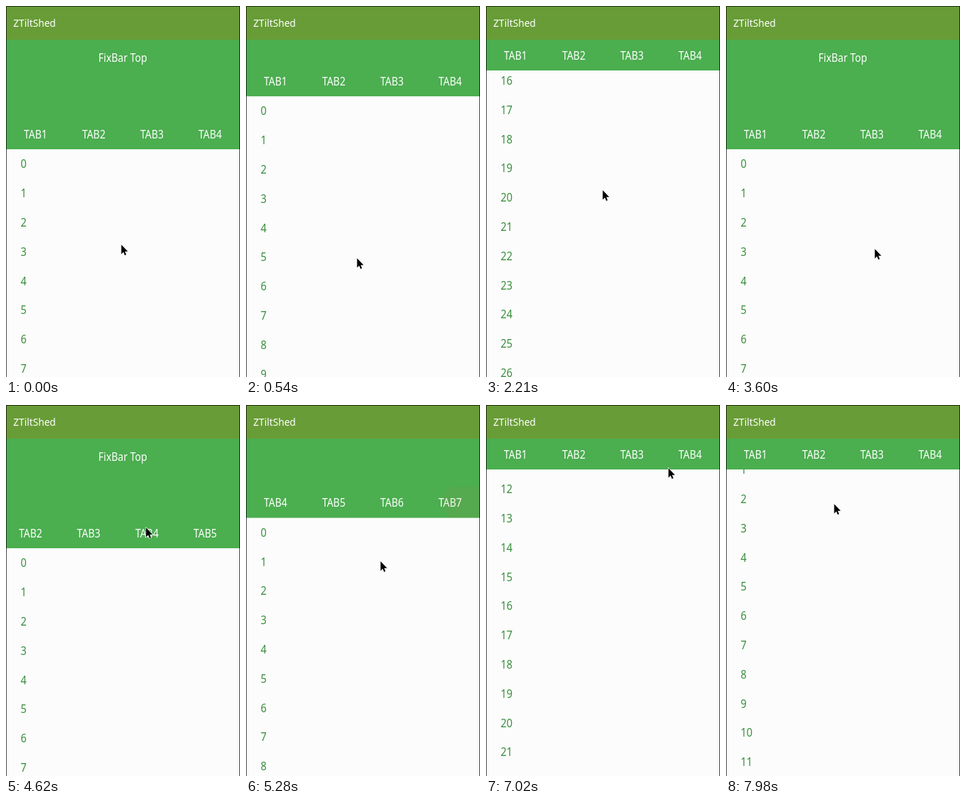
Animation, 328 px wide and 518 px high, one loop 8000 ms. Source, as an HTML page with a canvas:

```html
<!DOCTYPE html>
<html lang="en">
<head>
<meta charset="utf-8">
<style>
  html, body { margin: 0; width: 328px; height: 518px; overflow: hidden; background: #fcfcfc; }
  canvas { display: block; }
</style>
</head>
<body>
<canvas id="stage" width="328" height="518"></canvas>
<script>
const ctx = document.getElementById('stage').getContext('2d');
const LOOP = 8000, ROW = 40.8, COL = 81.6, NARROW = 0.9;

const progress = (t, start, length) => Math.min(1, Math.max(0, (t - start) / length));
const ease = p => p * p * (3 - 2 * p);
const glide = (t, start, length, distance) => distance * ease(progress(t, start, length));
const pulse = (t, start, length) => Math.sin(Math.PI * progress(t, start, length));

const scrollAt = t =>
  glide(t, 60, 780, 110) + glide(t, 986, 1660, 794) + glide(t, 2940, 560, -904) +
  glide(t, 5131, 929, 608) + glide(t, 6900, 1080, -437);

const tabShiftAt = t => glide(t, 4450, 420, 3 * COL) + glide(t, 6080, 400, -3 * COL);

// Places the pointer passes: time, x, y.
const stops = [
  [0, 162, 334], [1310, 146, 385], [2210, 164, 258], [2690, 178, 190],
  [2940, 178, 190], [3600, 209, 340], [4450, 280, 172], [4870, 50, 172],
  [5280, 189, 219], [6060, 83, 72], [6480, 300, 68], [7980, 152, 139]
];

function pointerAt(t) {
  const next = stops.findIndex(stop => stop[0] > t);
  if (next < 0) return stops.at(-1).slice(1);
  const [t0, x0, y0] = stops[next - 1], [t1, x1, y1] = stops[next];
  return [x0 + glide(t, t0, t1 - t0, x1 - x0), y0 + glide(t, t0, t1 - t0, y1 - y0)];
}

function rect(color, x, y, w, h) {
  ctx.fillStyle = color;
  ctx.fillRect(x, y, w, h);
}

function label(text, x, y, size, color = '#fff', align = 'left') {
  ctx.save();
  ctx.translate(x, y);
  ctx.scale(NARROW, 1);
  ctx.font = size + 'px "Noto Sans", "Open Sans", sans-serif';
  ctx.textAlign = align;
  ctx.fillStyle = color;
  ctx.fillText(text, 0, 0);
  ctx.restore();
}

// Overscroll light at one end of the tab row.
function glow(x, top, alpha) {
  ctx.save();
  ctx.beginPath();
  ctx.rect(0, top, 327, 43);
  ctx.clip();
  ctx.beginPath();
  ctx.ellipse(x, top + 21.5, 50, 40, 0, 0, 7);
  ctx.fillStyle = `rgba(200,120,70,${alpha})`;
  ctx.fill();
  ctx.restore();
}

const arrow = new Path2D('M0 0V16L3.7 12.5 6 18 8.5 17 6.2 11.5H11.2Z');
function pointer([x, y]) {
  ctx.save();
  ctx.translate(x - 0.4, y - 0.7);
  ctx.scale(0.82, 0.82);
  ctx.lineWidth = 1.5;
  ctx.strokeStyle = '#fff';
  ctx.stroke(arrow);
  ctx.fillStyle = '#000';
  ctx.fill(arrow);
  ctx.restore();
}

function draw(t) {
  const scroll = scrollAt(t), shift = tabShiftAt(t);
  const bottom = Math.max(90, 200 - scroll);

  rect('#fcfcfc', 0, 0, 328, 518);
  const first = Math.max(0, Math.floor((scroll - 150) / ROW));
  for (let i = first; i < first + 14; i++) {
    label(i, 20.5, 226.3 + i * ROW - scroll, 16.2, '#388e3c');
  }

  rect('#4bae4f', 0, 47, 328, bottom - 47);
  label('FixBar Top', 163.7, 78.3 - scroll, 15.5, '#fff', 'center');
  for (let i = 0; i < 7; i++) {
    label('TAB' + (i + 1), 41.4 + i * COL - shift, bottom - 15.4, 15.5, '#fff', 'center');
  }
  glow(327, bottom - 43, 0.11 * pulse(t, 4800, 640));
  glow(0, bottom - 43, 0.11 * pulse(t, 6420, 400));

  rect('#689c37', 0, 0, 328, 47);
  label('ZTiltShed', 10.3, 29.4, 15.2);

  ctx.strokeStyle = 'rgba(0,0,0,.7)';
  ctx.strokeRect(0.5, 0.5, 327, 519);
  pointer(pointerAt(t));
}

function tick() {
  draw(performance.now() % LOOP);
  requestAnimationFrame(tick);
}
tick();
</script>
</body>
</html>
```
